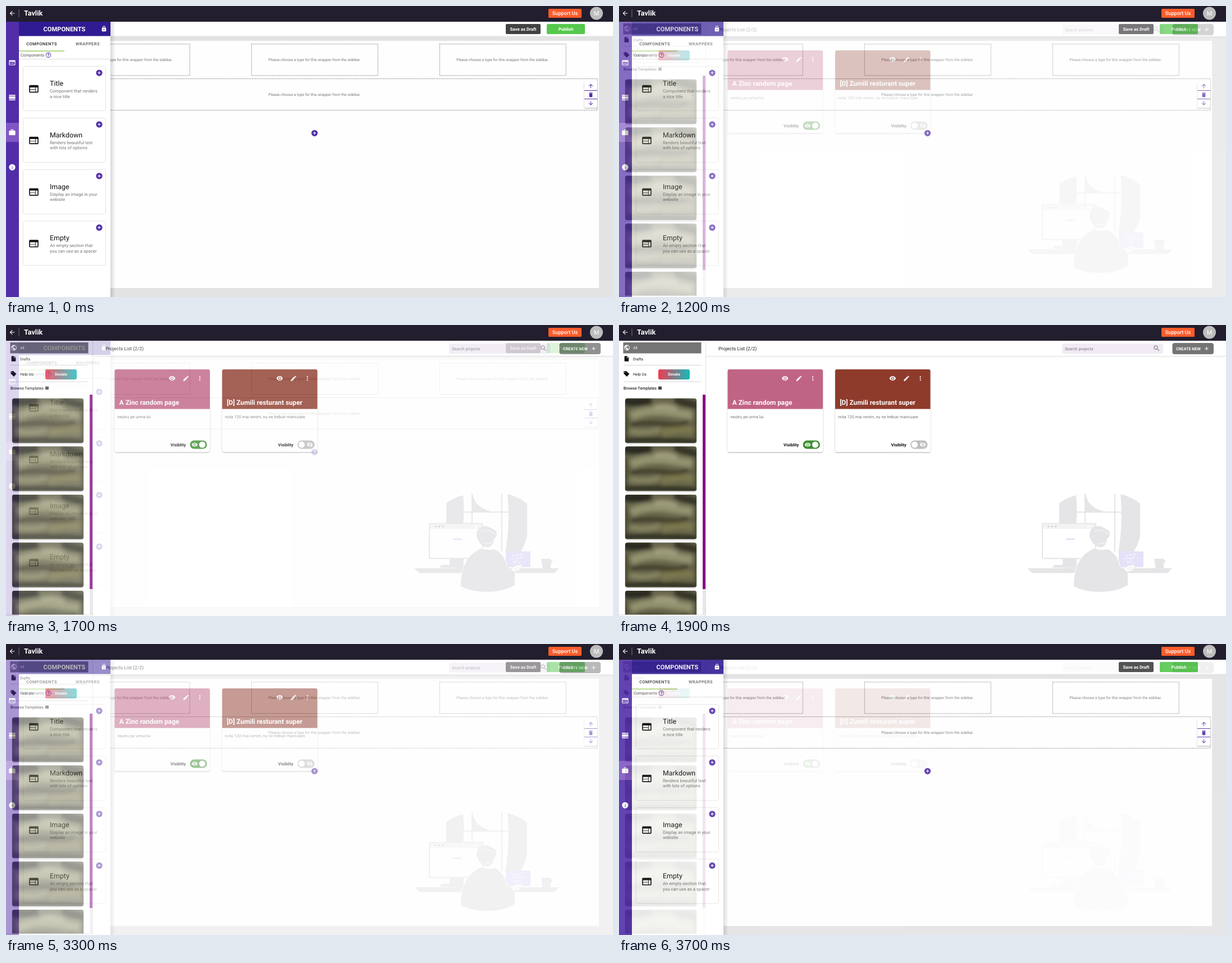
An HTML page for the animation above (3800 ms loop, 1081 by 518 pixels).

```html
<!DOCTYPE html>
<html lang="en">
<head>
<meta charset="utf-8">
<title>Page builder and project list</title>
<style>
  html, body { margin: 0; width: 100%; height: 100%; overflow: hidden; background: #fff; }
  svg { display: block; width: 100%; height: 100%; font-family: Roboto, sans-serif; text-rendering: geometricPrecision; }
</style>
</head>
<body>
<svg id="stage" viewBox="0 0 1081 518"></svg>
<script>
const PURPLE = '#512da8';
const DISC = 'M2 12a10 10 0 1 0 20 0a10 10 0 1 0-20 0z';
const EYE = 'M12 4.5C7 4.5 2.7 7.6 1 12c1.7 4.4 6 7.5 11 7.5s9.3-3.1 11-7.5c-1.7-4.4-6-7.5-11-7.5zM7 12a5 5 0 1 0 10 0a5 5 0 1 0-10 0zM9 12a3 3 0 1 0 6 0a3 3 0 1 0-6 0z';

// Icon outlines on a 24 unit grid, filled with the even-odd rule
const ICONS = {
  back: 'M20 11H7.8l5.6-5.6L12 4l-8 8 8 8 1.4-1.4L7.8 13H20z',
  web: 'M4 4h16a2 2 0 0 1 2 2v12a2 2 0 0 1-2 2H4a2 2 0 0 1-2-2V6a2 2 0 0 1 2-2zM4 9h11v4H4zM4 14h11v4H4zM16 9h4v9h-4z',
  rows: 'M2 3h20v3H2zM2 8h20v8H2zM2 18h20v3H2z',
  bag: 'M8 6V4a2 2 0 0 1 2-2h4a2 2 0 0 1 2 2v2h4a2 2 0 0 1 2 2v11a2 2 0 0 1-2 2H4a2 2 0 0 1-2-2V8a2 2 0 0 1 2-2zM10 4h4v2h-4z',
  info: DISC + 'M11 7h2v2h-2zM11 11h2v6h-2z',
  addDisc: DISC + 'M11 7h2v4h4v2h-4v4h-2v-4H7v-2h4z',
  add: 'M11 5h2v6h6v2h-6v6h-2v-6H5v-2h6z',
  lock: 'M7 8V6a5 5 0 0 1 10 0v2h1a2 2 0 0 1 2 2v10a2 2 0 0 1-2 2H6a2 2 0 0 1-2-2V10a2 2 0 0 1 2-2zM9 8h6V6a3 3 0 0 0-6 0zM10 15a2 2 0 1 0 4 0a2 2 0 1 0-4 0z',
  help: DISC + 'M4 12a8 8 0 1 0 16 0a8 8 0 1 0-16 0zM11 16h2v2h-2zM8 10a4 4 0 0 1 8 0c0 2.5-3 2.7-3 5h-2c0-3.2 3-3 3-5a2 2 0 0 0-4 0z',
  trash: 'M6 7h12v12a2 2 0 0 1-2 2H8a2 2 0 0 1-2-2zM5 4h3.5l1-1h5l1 1H19v2H5z',
  globe: DISC + 'M4.2 10.2L9 15v1a2 2 0 0 0 2 2v2a8 8 0 0 1-6.8-9.8zM15 4.6a8 8 0 0 1 3 12.8a2 2 0 0 0-2-1.4h-1v-4H8v-2h3V7h2a2 2 0 0 0 2-2z',
  file: 'M6 2h8l6 6v12a2 2 0 0 1-2 2H6a2 2 0 0 1-2-2V4a2 2 0 0 1 2-2zM13 3.5V9h5.5z',
  tag: 'M4 2h7l11 10-9 10L2 11V4a2 2 0 0 1 2-2zM4 5.5a1.5 1.5 0 1 0 3 0a1.5 1.5 0 1 0-3 0z',
  eye: EYE,
  eyeOff: EYE + 'M2 4l1.5-1.5L22 21l-1.5 1.5z',
  pencil: 'M3 17.2V21h3.8L17.8 9.9l-3.7-3.7zM15.1 5.1l2.5-2.3 3.8 3.8-2.5 2.3z',
  dots: [6, 12, 18].map(y => `M10 ${y}a2 2 0 1 0 4 0a2 2 0 1 0-4 0z`).join(''),
  search: 'M3 9.5a6.5 6.5 0 1 0 13 0a6.5 6.5 0 1 0-13 0zM5 9.5a4.5 4.5 0 1 0 9 0a4.5 4.5 0 1 0-9 0zM14 15.5l1.5-1.5 5 5-1.5 1.5z',
};

const BOLD = 'font-weight="700"', MEDIUM = 'font-weight="500"', MID = 'text-anchor="middle"';
const rect = (x, y, w, h, fill, more = '') =>
  `<rect x="${x}" y="${y}" width="${w}" height="${h}" fill="${fill}" ${more}/>`;
const circle = (x, y, r, fill) => `<circle cx="${x}" cy="${y}" r="${r}" fill="${fill}"/>`;
const path = (d, fill, more = '') => `<path d="${d}" fill="${fill}" ${more}/>`;
const text = (x, y, size, str, fill, more = '') =>
  `<text x="${x}" y="${y}" font-size="${size}" fill="${fill}" ${more}>${str}</text>`;
const icon = (name, x, y, size, fill, turn = 0) =>
  path(ICONS[name], fill, `fill-rule="evenodd" transform="translate(${x} ${y}) rotate(${turn}) scale(${size / 24}) translate(-12 -12)"`);

// Stormy sky in a few soft strokes
const painting = () => {
  const strokes = [
    ['M10 32Q40 18 78 24T120 30', 16, '#9b9a76'],
    ['M52 16Q74 10 92 20', 10, '#a5a382'],
    ['M8 58Q34 64 62 56', 8, '#918f68'],
    ['M66 62Q96 52 122 58', 13, '#7f7c50'],
    ['M-4 4Q26 8 46 2', 16, '#1f2018'],
    ['M88 3Q112 8 130 14', 13, '#2b2b1f'],
    ['M10 46Q44 42 72 46T112 40', 7, '#35341f'],
    ['M-4 76Q50 72 130 78', 9, '#27261a'],
    ['M1 20V70M127 20V70', 5, '#33321f'],
  ].map(([d, width, color]) => path(d, 'none', `stroke="${color}" stroke-width="${width}" opacity=".85"`)).join('');
  return `<g id="painting">${rect(0, 0, 127, 79, '#444', 'rx="4" filter="url(#drop)"')}
    <g clip-path="url(#frame)">${rect(0, 0, 127, 79, '#65644a')}<g filter="url(#soft)">${strokes}</g></g></g>`;
};

const defs = () => `<defs>
  <linearGradient id="edge"><stop stop-color="#000" stop-opacity=".15"/><stop offset="1" stop-color="#000" stop-opacity="0"/></linearGradient>
  <linearGradient id="donate"><stop stop-color="#f23a50"/><stop offset="1" stop-color="#12bcbc"/></linearGradient>
  <filter id="soft" x="-20%" y="-20%" width="140%" height="140%"><feGaussianBlur stdDeviation="3.5"/></filter>
  <filter id="drop" x="-50%" y="-50%" width="200%" height="200%"><feDropShadow dx="0" dy="1.2" stdDeviation="1" flood-opacity=".3"/></filter>
  <clipPath id="frame"><rect width="127" height="79" rx="4"/></clipPath>
  ${painting()}
</defs>`;

const header = () =>
  rect(0, 0, 1081, 28, '#221e2d') + icon('back', 11, 13, 13, '#fff') + rect(22.5, 6, 1, 14, '#77747f') +
  text(32, 17, 12.6, 'Tavlik', '#fff', BOLD) +
  rect(966, 5, 59, 16, '#ff5c2b', 'rx="1.5"') + text(995.5, 16.3, 9.1, 'Support Us', '#fff', `${MID} ${MEDIUM}`) +
  circle(1051.5, 13, 11.5, '#bdbdbd') + text(1051.5, 17, 11, 'M', '#fff', MID);

const wrapper = (x, y, w, textX) =>
  rect(x, y, w, 56, 'none', 'stroke="#6b6b6b" stroke-dasharray="1.4 1.6"') +
  text(textX, y + 30.2, 6.73, 'Please choose a type for this wrapper from the sidebar.', '#757575', MID);

const component = ([title, line1, line2], i) => `<g transform="translate(0 ${i * 91.8})">` +
  rect(30.5, 107.5, 147, 79, '#fff', 'rx="3" stroke="#e3e3e3"') +
  icon('web', 49.5, 147.5, 20, '#111') + icon('addDisc', 166, 119, 13.5, PURPLE) +
  text(78, 142, 12.4, title, '#111') + text(78, 154, 7.85, line1, '#757575') + text(78, 163.5, 7.85, line2, '#757575') + '</g>';

const builder = () =>
  rect(0, 28, 1081, 490, '#fff') + rect(0, 53.5, 1081, 464.5, '#e3e3e3') + rect(100, 62, 956, 440, '#fefefe') +
  rect(890, 32, 62, 18, '#424242', 'rx="2"') + text(921, 43.6, 7.9, 'Save as Draft', '#fff', `${MID} ${BOLD}`) +
  rect(963, 32, 68, 18, '#55c84d', 'rx="2"') + text(997, 43.6, 7.9, 'Publish', '#fff', `${MID} ${BOLD}`) +
  [102, 437, 772].map(x => wrapper(x + .3, 67.8, 225, x + 112.5)).join('') + wrapper(102, 129.5, 951, 549.5) +
  icon('addDisc', 549.5, 226.3, 13.5, PURPLE) +
  rect(1030, 135, 23, 46, '#fff', 'rx="1" filter="url(#drop)"') +
  rect(1030, 150, 23, 1, PURPLE) + rect(1030, 165, 23, 1, PURPLE) +
  icon('back', 1041.5, 142.5, 11, PURPLE, 90) + icon('trash', 1041.5, 158, 11, PURPLE) + icon('back', 1041.5, 173, 11, PURPLE, -90) +
  rect(186, 28, 9, 490, 'url(#edge)') +
  rect(0, 28, 23, 490, PURPLE) + rect(0, 208, 23, 34, '#8057c4') +
  ['web', 'rows', 'bag', 'info'].map((name, i) => icon(name, 11, 101 + 62 * i, 13.5, '#fff')).join('') +
  rect(23, 28, 163, 490, '#fff') + rect(23, 28, 163, 25.5, '#311b92') +
  text(104, 45, 11.1, 'COMPONENTS', '#fff', `${MID} ${BOLD}`) + icon('lock', 174.5, 40.5, 11.5, '#fff') +
  text(63.5, 69.7, 7.4, 'COMPONENTS', '#222', `${MID} ${MEDIUM} letter-spacing=".5"`) +
  text(145.5, 69.7, 7.4, 'WRAPPERS', '#555', `${MID} ${MEDIUM} letter-spacing=".5"`) +
  rect(23, 79.5, 81, 1.3, '#8bc34a') +
  text(26, 90, 7.4, 'Components', '#555') + icon('help', 75.5, 87.3, 11.5, PURPLE) + rect(23, 94, 163, 1, '#dcdcdc') +
  [
    ['Title', 'Component that renders', 'a nice title'],
    ['Markdown', 'Renders beautiful text', 'with lots of options'],
    ['Image', 'Display an image in your', 'website'],
    ['Empty', 'An empty section that', 'you can use as a spacer'],
  ].map(component).join('');

const project = (x, color, title, note, visible) => `<g transform="translate(${x} 79)">` +
  rect(0, 0, 169.5, 147, '#fff', 'rx="3" filter="url(#drop)"') +
  path('M0 70.5V3a3 3 0 0 1 3-3h163.5a3 3 0 0 1 3 3v67.5z', color) +
  ['eye', 'pencil', 'dots'].map((name, i) => icon(name, 102.3 + 24.7 * i, 16, 12.5, '#fff')).join('') +
  text(8.3, 63, 11.8, title, '#fff', BOLD) + text(5, 86.5, 7.34, note, '#757575') +
  text(99.5, 136.5, 7.5, 'Visiblity', '#111', BOLD) +
  rect(134, 126.5, 30.5, 15, visible ? '#3f8f33' : '#bdbdbd', 'rx="7.5"') +
  circle(visible ? 156 : 141.5, 134, 5.6, '#fff') +
  icon(visible ? 'eye' : 'eyeOff', visible ? 142.5 : 156, 134, 11.5, '#fff') + '</g>';

const illustration = () => {
  const grey = '#e5e5e7', lilac = '#e6e1f9', line = `stroke="${grey}" stroke-width="2"`;
  return path('M784 317Q798 307 814 303Q817 330 814 354H784z', grey) +
    path('M893 301Q914 306 928 318V376Q924 392 916 405H889Q898 355 893 301z', grey) +
    path('M830 300V354M883 300V404M814 333H896', 'none', line) +
    path('M831 300Q834 326 868 333H831z', grey) +
    rect(754, 353.5, 95, 62, '#fff', `rx="1" ${line}`) + rect(755, 354.5, 93, 8.5, '#f3f3f4') +
    [765, 771.5, 778].map(x => circle(x, 358.5, 1.8, '#d6d6d9')).join('') + rect(834, 357, 6, 3, '#fff') +
    rect(796, 380, 16, 2.6, lilac) +
    path('M771 432L776 427H790V416H815V433z', grey) +
    path('M727 433H985L977 441.5H736z', grey) +
    path('M953 416H970V434H956zM970 419H974L970 426', grey) +
    rect(890, 403, 44, 28, lilac, 'rx="1"') +
    path('M902 411L922 407M900 416L924 414M905 425L920 409M903 421L918 424', 'none', 'stroke="#fff" stroke-dasharray="5 2"') +
    path('M810 465C810 430 822 408 846 398Q858 402 870 399C884 406 890 418 892 430L906 440V463Q886 475 857 475Q828 475 810 465z', grey, 'stroke="#fff" stroke-width="2" paint-order="stroke"') +
    path('M838 376C837 362 846 357 857 358Q866 362 872 366Q876 372 872 378L869 381Q869 393 858 396Q843 394 838 376z', grey) +
    path('M847 368Q857 361 872 373M868 385Q862 391 852 389', 'none', 'stroke="#fff" stroke-width=".8"') +
    path('M900 433Q908 426 918 427Q921 433 912 438Q904 441 900 436zM893 430L902 437', '#fff', `stroke="${grey}"`) +
    path('M904 434L914 430M906 437L917 432', 'none', `stroke="${grey}"`);
};

const projects = () =>
  rect(0, 28, 1081, 490, '#fff') + rect(154, 55.5, 927, 1, '#d9d9d9') + rect(154, 28, 1, 490, '#e0e0e0') +
  rect(7.5, 31, 139, 19.5, '#757575') + icon('globe', 14, 40.5, 12, '#fff') + text(25, 43.3, 6.75, 'All', '#fff') +
  icon('file', 13.5, 60, 11.5, '#111') + text(25, 63, 6.75, 'Drafts', '#111') + rect(8, 71, 138, 1, '#d4d4d4') +
  icon('tag', 13.5, 87, 12, '#111') + text(25, 90, 6.75, 'Help Us:', '#111') +
  rect(70, 79, 56, 18, 'url(#donate)', 'rx="3"') + text(98, 90, 6.8, 'Donate', '#fff', `${MID} ${BOLD}`) +
  rect(8, 100.5, 138, 1, '#d4d4d4') + text(8, 115, 7.15, 'Browse Templates', '#222', MEDIUM) + rect(70, 109.5, 6, 5.5, '#444') +
  [0, 1, 2, 3, 4].map(i => `<use href="#painting" x="11" y="${130.7 + 85.6 * i}"/>`).join('') +
  rect(0, 516, 154, 2, '#fff') + rect(0, 515.5, 154, 1, '#dcdcdc') +
  rect(149, 124, 5, 392, '#e6e6e6') + rect(149, 124, 5, 346, '#870f87') +
  text(177, 45, 8.5, 'Projects List (2/2)', '#222') +
  rect(789, 33, 180, 18, '#f1ebf4', 'rx="3"') + text(794, 44.6, 7.35, 'Search projects', '#7d7880') +
  icon('search', 957.5, 41.5, 13.5, '#757575') +
  rect(985.5, 32, 73.5, 20, '#757575', 'rx="4"') + text(992, 44.6, 7.25, 'CREATE NEW', '#fff', BOLD) + icon('add', 1046.5, 42, 11.5, '#fff') +
  project(193.5, '#c06486', 'A Zinc random page', 'neutru pe urma lui', true) +
  project(385, '#8e3b2c', '[D] Zumili resturant super', 'nota 120 mai venim, nu ne trebuir mancuare', false) +
  illustration();

document.getElementById('stage').innerHTML =
  `${defs()}<g>${builder()}</g><g id="projects">${projects()}</g>${header()}`;
const overlay = document.getElementById('projects');

// Each screen holds for a second, then cross-fades in ten steps of 100 ms
const LOOP = 3800, STEP = 100;
const fade = (t, start) => Math.min(10, Math.max(0, Math.floor((t - start) / STEP) + 1)) / 10;

function draw() {
  const t = performance.now() % LOOP;
  overlay.setAttribute('opacity', (fade(t, 1000) - fade(t, 2900)).toFixed(2));
  requestAnimationFrame(draw);
}
draw();
</script>
</body>
</html>
```
